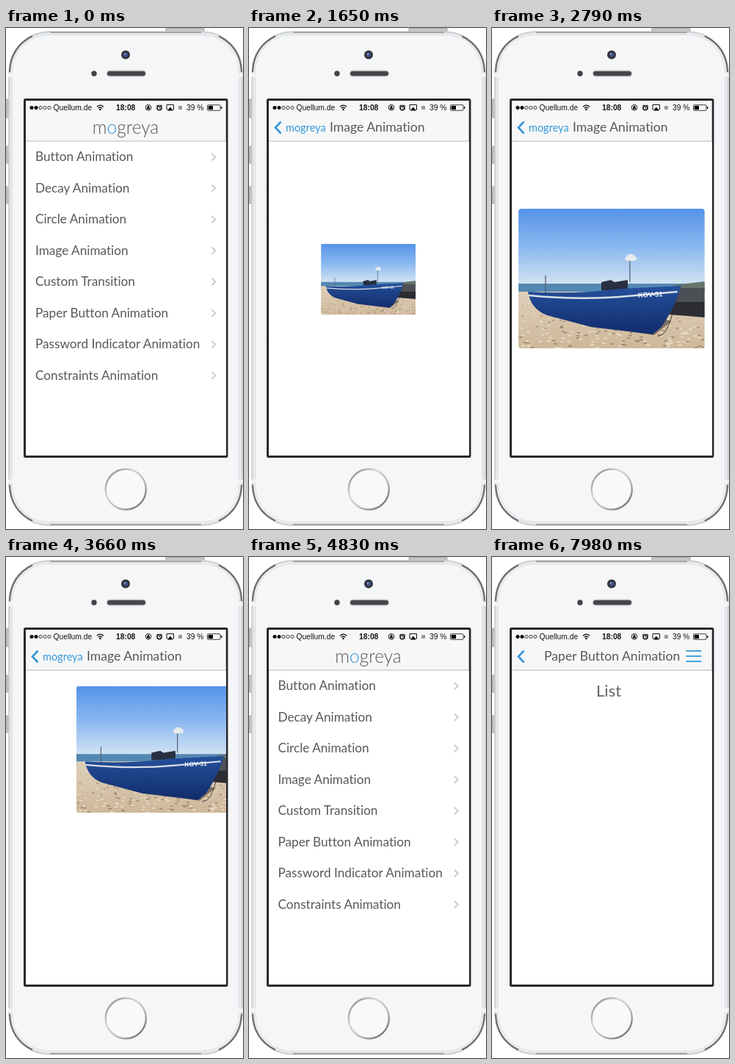
An HTML page for the animation above (8000 ms loop, 323 by 682 pixels).

```html
<!DOCTYPE html>
<html lang="en">
<head>
<meta charset="utf-8">
<title>Phone demo</title>
<style>
  html, body { margin: 0; width: 100%; height: 100%; overflow: hidden; background: #fff; }
  svg { display: block; width: 100vw; height: 100vh; }
  text { font-family: Lato, "Open Sans", sans-serif; font-variant-ligatures: none; fill: #58585a; font-size: 17.2px; }
  .status text { font: 10.3px "Liberation Sans", Arial, sans-serif; fill: #111; }
  .line { fill: none; stroke-linecap: butt; }
  .blue { stroke: #3498db; }
</style>
</head>
<body>
<svg viewBox="0 0 323 682" preserveAspectRatio="none">
  <defs>
    <linearGradient id="ring" x2="1" y2="1">
      <stop offset="0" stop-color="#77797b"/><stop offset=".35" stop-color="#d5d7d9"/>
      <stop offset=".65" stop-color="#b4b6b8"/><stop offset="1" stop-color="#55575a"/>
    </linearGradient>
    <linearGradient id="sky" x2="0" y2="1">
      <stop offset="0" stop-color="#5593e8"/><stop offset=".5" stop-color="#8ab8f0"/>
      <stop offset="1" stop-color="#d3e3f3"/>
    </linearGradient>
    <linearGradient id="sand" x2="0" y2="1">
      <stop offset="0" stop-color="#dfd0ba"/><stop offset="1" stop-color="#cdb799"/>
    </linearGradient>
    <linearGradient id="hull" x2="0" y2="1">
      <stop offset="0" stop-color="#24509c"/><stop offset="1" stop-color="#122c6c"/>
    </linearGradient>
    <clipPath id="content"><rect x="27" y="154.5" width="273" height="427.5"/></clipPath>
    <clipPath id="barArea"><rect x="27" y="99" width="273" height="55"/></clipPath>
    <clipPath id="photoArea"><rect x="-127" y="-95" width="254" height="190" rx="4"/></clipPath>
  </defs>

  <!-- Phone -->
  <g fill="#c3c5c7" stroke="#8d8f91" stroke-width=".8">
    <rect x="218" y="0" width="52" height="6" rx="1.5"/>
    <rect x="0" y="97" width="5" height="25" rx="1.5"/>
    <rect x="0" y="161" width="5" height="23" rx="1.5"/>
    <rect x="0" y="216" width="5" height="23" rx="1.5"/>
  </g>
  <rect x="5.5" y="6.5" width="315" height="669" rx="53" fill="#f5f6f8" stroke="#e3e6e8" stroke-width="4"/>
  <rect x="4" y="5" width="318" height="672" rx="54.5" fill="none" stroke="#b9bbbd"/>
  <rect x="8.5" y="9.5" width="309" height="663" rx="50" fill="none" stroke="#d3d6d8" stroke-width=".8"/>
  <g class="line" stroke="#68696c" stroke-width="2">
    <path d="M5 60Q6 26 36 11M290 11Q320 26 321 60M5 622Q6 656 36 671M290 671Q320 656 321 622"/>
    <path d="M60 6H266M60 676H266" stroke="#a3a5a7"/>
  </g>
  <path d="M3 64H9M317 64H323M3 617H9M317 617H323" stroke="#f3f4f5" stroke-width="5"/>
  <circle cx="163" cy="36.5" r="6" fill="#33343c"/>
  <circle cx="163" cy="36.5" r="3" fill="#40558c"/>
  <circle cx="162" cy="35.5" r="1.1" fill="#8fa8dc"/>
  <circle cx="120" cy="62" r="3.7" fill="#414246"/>
  <rect x="137.5" y="58.2" width="53" height="7.6" rx="3.8" fill="#454649" stroke="#c5c7c9" stroke-width="1.2"/>
  <circle cx="163.3" cy="628" r="27.5" fill="#f8f9fb" stroke="url(#ring)" stroke-width="2.4"/>
  <rect x="25.5" y="97.5" width="275.5" height="486" rx="1" fill="#fff" stroke="#29292d" stroke-width="3"/>

  <!-- Screens -->
  <g clip-path="url(#content)">
    <g id="list">
      <rect x="27" y="154" width="274" height="428" fill="#fff"/>
      <g id="rows"></g>
    </g>
    <rect id="shade" x="27" y="154" width="274" height="428"/>
    <g id="detail">
      <rect x="27" y="154" width="274" height="428" fill="#fff"/>
      <g id="photo">
        <g clip-path="url(#photoArea)">
          <rect x="-127" y="-95" width="254" height="104" fill="url(#sky)"/>
          <path d="M-127 7H127V20H-127Z" fill="#5288b2"/>
          <path d="M85 9L127 4V20H85Z" fill="#66746c"/>
          <rect x="-127" y="18" width="254" height="77" fill="url(#sand)"/>
          <g id="pebbles"></g>
          <path d="M84 13H127V32H84Z" fill="#4c4f55"/>
          <path d="M84 32H127V53L78 49Z" fill="#2c2c33"/>
          <path d="M-95 45L-30 64L58 77L82 58L60 52L-80 38Z" fill="#7d6e62"/>
          <path d="M-90 -4V20M25 5V-30" stroke="#55606e" stroke-width="1.3"/>
          <path d="M18 -27Q26 -40 35 -27L32 -24H21Z" fill="#e6ebee"/>
          <path d="M-14 16V5L-1 2L4 5L22 2V16Z" fill="#272f40"/>
          <path d="M-114 18Q-50 22 12 14L95 10Q86 40 68 66L56 76L-28 66L-88 50Q-110 42 -114 18Z" fill="url(#hull)"/>
          <path d="M-113 23Q-40 30 22 24L90 18" fill="none" stroke="#d8dfe8" stroke-width="2.4"/>
          <path d="M83 48Q76 77 63 79" fill="none" stroke="#3a3434"/>
          <text x="36" y="26" transform="rotate(-3 36 26)" style="font:bold 9.5px 'Liberation Sans',sans-serif;fill:#f2f5f8">KOV-31</text>
        </g>
      </g>
      <text id="label" y="190.3" text-anchor="middle" style="font-size:22px;fill:#666"></text>
    </g>
  </g>

  <!-- Navigation bar -->
  <rect x="27" y="99" width="272.5" height="55" fill="#f7f7f7"/>
  <path d="M27 154H299.5" stroke="#b9b9bb" stroke-width="1"/>
  <g clip-path="url(#barArea)">
    <text id="logo" x="163" y="143.5" text-anchor="middle" style="font-size:24.5px;font-weight:300">m<tspan fill="#3498db">o</tspan>greya</text>
    <path id="chevron" class="line blue" stroke-width="2.7" d="M43.5 127.5L36 135.5L43.5 143.5"/>
    <text id="back" x="50" y="140.8" style="font-size:14.5px;fill:#3498db">mogreya</text>
    <text id="title" y="141" style="font-size:17.6px"></text>
    <g id="menu" class="line blue" stroke-width="1.8">
      <path id="top" d="M-10.5 0H10.5"/><path id="middle" d="M264.5 135H285.5"/><path id="bottom" d="M-10.5 0H10.5"/>
    </g>
  </g>

  <!-- Status bar -->
  <g class="status">
    <g stroke="#111" stroke-width=".8">
      <circle cx="35" cy="108.5" r="2.2"/><circle cx="41" cy="108.5" r="2.2"/>
      <g fill="none"><circle cx="47" cy="108.5" r="2.1"/><circle cx="53" cy="108.5" r="2.1"/><circle cx="59" cy="108.5" r="2.1"/></g>
    </g>
    <text x="64.5" y="112">Quellum.de</text>
    <path class="line" stroke="#111" stroke-width="1.3" d="M124 107.2Q128.5 103 133 107.2M125.8 109.3Q128.5 106.7 131.2 109.3"/>
    <circle cx="128.5" cy="111" r="1.2"/>
    <text x="150" y="112" style="font-weight:bold">18:08</text>
    <circle class="line" cx="194" cy="108.3" r="3.8" stroke="#111"/>
    <path d="M192 108H196V110.5H192ZM192.8 108V106H195.2V108" fill="#111"/>
    <circle cx="209" cy="108.7" r="3" fill="none" stroke="#111" stroke-width="1.6"/>
    <path class="line" stroke="#111" d="M205 106.5L207 104.5M213 106.5L211 104.5M209 107V109H210.5"/>
    <path class="line" stroke="#111" d="M220.5 111H219V104.5H228.5V111H227"/>
    <path d="M220 112.5L223.8 107.5L227.6 112.5Z"/>
    <rect x="235" y="106" width="5" height="5" fill="#999"/>
    <text x="246" y="112">39 %</text>
    <rect x="274.5" y="104.7" width="17.5" height="7.6" rx="1" fill="none" stroke="#111" stroke-width=".8"/>
    <rect x="275.7" y="105.9" width="6.3" height="5.2"/>
    <rect x="293" y="107" width="1.3" height="3"/>
  </g>
</svg>
<script>
const LOOP = 8000, WIDTH = 274;
const PUSH_IMAGE = 750, POP = 4300, PUSH_PAPER = 5300;
const OPEN_MENU = 6150, CLOSE_MENU = 7290, LABEL_EXIT = 200;
const GRAB = [1270, 3270], RELEASE = [2310, 3565];
const DRAGS = [
  [[1620, 0, 0], [2050, -45, 127], [RELEASE[0], -38, 85]],
  [[3290, 0, 0], [RELEASE[1], 78, -128]],
];
const ROWS = ["Button", "Decay", "Circle", "Image", "Custom", "Paper Button", "Password Indicator", "Constraints"];

const el = Object.fromEntries([...document.querySelectorAll("svg [id]")].map(e => [e.id, e]));
const clamp = v => Math.min(1, Math.max(0, v));
const smooth = v => v * v * (3 - 2 * v);
const set = (e, attrs) => { for (const k in attrs) e.setAttribute(k, attrs[k]); };
const move = (e, x, y = 0, extra = "") => e.setAttribute("transform", `translate(${x} ${y}) ${extra}`);

// Step responses from 0 to 1; ms is the time since the step.
function spring(ms, frequency, damping) {
  const s = Math.max(0, ms) / 1000, a = frequency * s;
  return 1 - Math.exp(-damping * s) * (Math.cos(a) + damping / frequency * Math.sin(a));
}
function settle(ms, rate) {
  const a = rate * Math.max(0, ms) / 1000;
  return 1 - (1 + a) * Math.exp(-a);
}

el.rows.innerHTML = ROWS.map((name, i) => {
  const y = 175 + 42.5 * i;
  const text = name + (name === "Custom" ? " Transition" : " Animation");
  return `<rect x="27" y="${y - 21}" width="274" height="42.5" fill="#d9d9d9" opacity="0"/>
    <text x="40" y="${y + 6}">${text}</text>
    <path class="line" stroke="#c7c7cc" stroke-width="1.8" d="M280.5 ${y - 4.2}l4.8 4.8l-4.8 4.8"/>`;
}).join("");
const highlights = el.rows.querySelectorAll("rect");

let seed = 7;
const random = () => (seed = seed * 16807 % 2147483647) / 2147483647;
el.pebbles.innerHTML = Array.from({ length: 260 }, (_, i) => {
  const depth = random(), size = 1 + 2 * depth;
  return `<ellipse cx="${254 * random() - 127}" cy="${22 + 73 * depth}" rx="${size}" ry="${size * 0.4}"
    fill="${i % 2 ? "#8f7b65" : "#efe4d3"}" opacity=".75"/>`;
}).join("");

function dragOffset(t) {
  const points = DRAGS[t < DRAGS[1][0][0] ? 0 : 1];
  const [end, endX, endY] = points[points.length - 1];
  if (t >= end) {
    const left = 1 - settle(t - end, 14);
    return [endX * left, endY * left];
  }
  const i = points.findIndex(p => t < p[0]);
  if (i === 0) return [0, 0];
  const [a, b] = [points[i - 1], points[i]];
  const k = smooth((t - a[0]) / (b[0] - a[0]));
  return [a[1] + (b[1] - a[1]) * k, a[2] + (b[2] - a[2]) * k];
}

function drawPhoto(t) {
  const size = ms => 0.5 * spring(t - ms, 17, 11);
  const scale = 1 - size(GRAB[0]) + size(RELEASE[0]) - size(GRAB[1]) + size(RELEASE[1]);
  const [x, y] = dragOffset(t);
  move(el.photo, 163.3 + x, 340.2 + y, `scale(${scale})`);
}

function drawMenu(t) {
  const cross = spring(t - OPEN_MENU, 26, 5.8) - spring(t - CLOSE_MENU, 26, 5.8);
  const gap = 7.2 * (1 - cross);
  move(el.top, 275, 135 - gap, `rotate(${45 * cross})`);
  move(el.bottom, 275, 135 + gap, `rotate(${-45 * cross})`);
  set(el.middle, { opacity: 1 - clamp((t - OPEN_MENU) / 200) + clamp((t - CLOSE_MENU) / 200) });

  const closing = t >= CLOSE_MENU;
  const ms = t - (closing ? CLOSE_MENU : OPEN_MENU);
  const entering = ms >= LABEL_EXIT;
  const away = entering ? 1 - spring(ms - LABEL_EXIT, 14, 9) : clamp(ms / LABEL_EXIT) ** 1.9;
  el.label.textContent = closing === entering ? "List" : "Menu";
  set(el.label, { x: 163 - WIDTH * away });
}

function drawNavigation(t, paper) {
  const slide = start => settle(t - start, 13.5);
  const p = slide(PUSH_IMAGE) - slide(POP) + slide(PUSH_PAPER);
  const fade = clamp(p);
  move(el.list, -0.3 * WIDTH * p);
  move(el.detail, WIDTH * (1 - p));
  set(el.shade, { opacity: 0.1 * fade });
  move(el.logo, -85 * p);
  set(el.logo, { opacity: clamp(1 - 1.3 * p) });
  el.title.textContent = paper ? "Paper Button Animation" : "Image Animation";
  set(el.title, { x: paper ? 71 : 110, opacity: fade });
  move(el.title, WIDTH / 2 * (1 - p));
  move(el.back, 70 * (1 - p));
  set(el.back, { opacity: paper ? 0 : fade });
  set(el.chevron, { opacity: fade });
  set(el.menu, { opacity: paper ? fade : 0 });

  set(highlights[3], { opacity: t < 720 ? 0 : 1 - clamp((t - POP) / 400) });
  set(highlights[5], { opacity: t < PUSH_PAPER - 60 ? 0 : 1 });
}

function frame(now) {
  const t = now % LOOP;
  const paper = t >= 5000;
  el.photo.style.display = paper ? "none" : "";
  el.label.style.display = paper ? "" : "none";
  drawNavigation(t, paper);
  drawPhoto(t);
  drawMenu(t);
  requestAnimationFrame(frame);
}
frame(performance.now());
</script>
</body>
</html>
```
